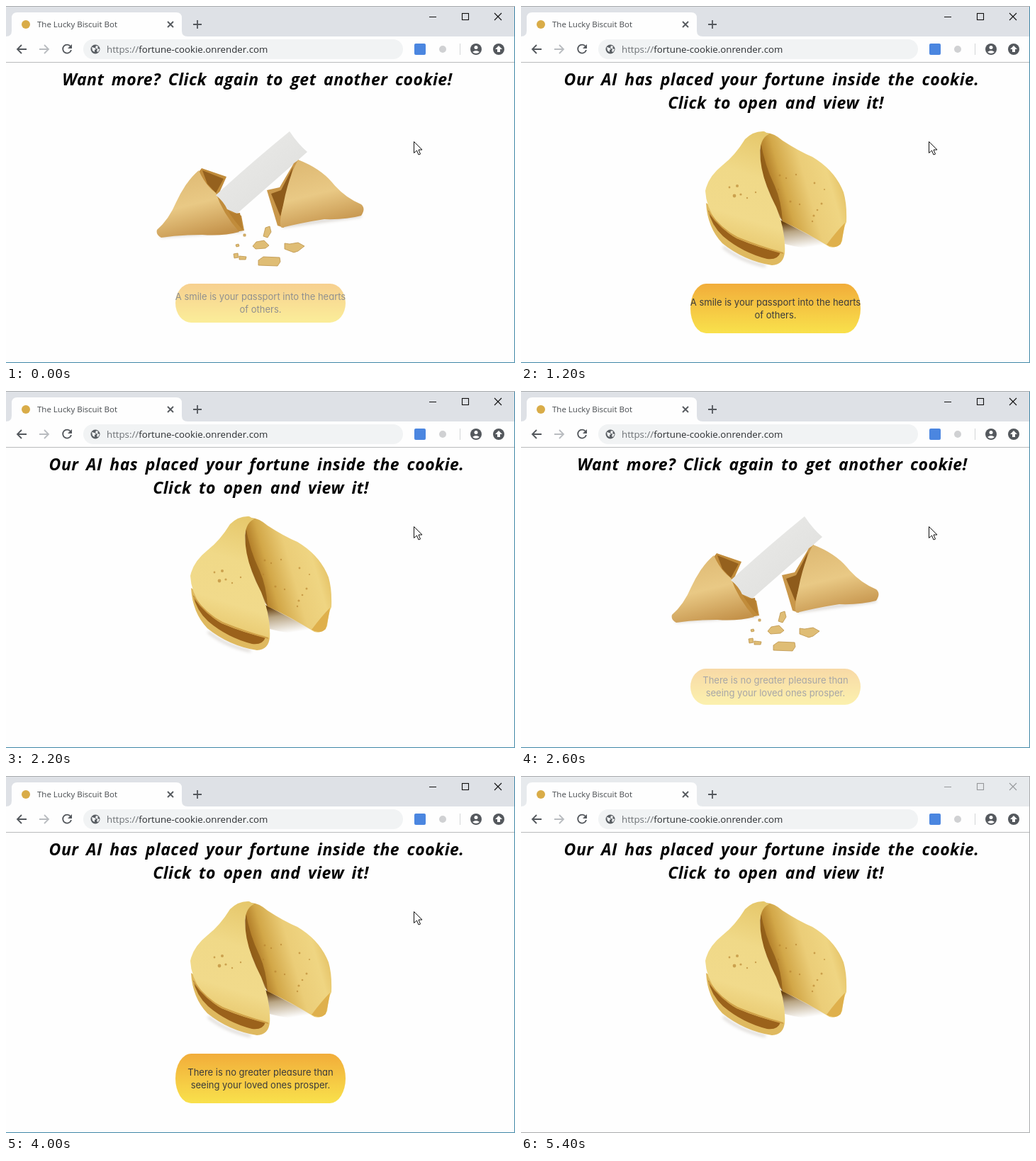
These frames come from a looping animation (718x504 px, 5600 ms). An HTML page:

```html
<!DOCTYPE html>
<html lang="en">
<head>
<meta charset="utf-8">
<title>Cookie</title>
<style>
  html, body { margin: 0; width: 100%; height: 100%; overflow: hidden; background: #fefefe; }
  svg { display: block; }
  text { white-space: pre; }
  .ui { font-family: "Open Sans", "Noto Sans", sans-serif; }
  .head { font: italic 700 23px "Comic Sans MS", "Open Sans", sans-serif; letter-spacing: .5px; word-spacing: 4px; text-anchor: middle; }
  .fortune { font: 13px "Comic Sans MS", Inter, sans-serif; font-feature-settings: "cv11"; text-anchor: middle; }
  .line { fill: none; stroke: #54585d; stroke-width: 1.8; }
  #controls { fill: none; stroke: #111; stroke-width: 1.1; }
  .off #controls { stroke: #96989b; }
  #strip { fill: #dee1e6; }
  .off #strip { fill: #e7eaed; }
  #edge { fill: none; stroke: #3f86a6; }
  .off #edge { stroke: #a9abad; }
  .off #cursor { display: none; }
</style>
</head>
<body>
<svg id="stage" width="718" height="504" viewBox="0 0 718 504">
  <defs>
    <linearGradient id="gold" x2="0" y2="1"><stop stop-color="#ee9500"/><stop offset="1" stop-color="#f8d917"/></linearGradient>
    <linearGradient id="lobe" x1=".6" x2=".4" y2="1">
      <stop stop-color="#e6c86c"/><stop offset=".35" stop-color="#f0d988"/><stop offset=".7" stop-color="#f1da8b"/><stop offset="1" stop-color="#e6c468"/>
    </linearGradient>
    <linearGradient id="flap" x1=".1" y1=".5" x2=".9" y2=".2">
      <stop stop-color="#a8711f"/><stop offset=".2" stop-color="#d2a748"/><stop offset=".5" stop-color="#ebcd78"/><stop offset=".8" stop-color="#efd582"/><stop offset="1" stop-color="#e3bf61"/>
    </linearGradient>
    <linearGradient id="shell" x1=".3" x2=".6" y2="1">
      <stop stop-color="#deb973"/><stop offset=".5" stop-color="#e9c985"/><stop offset="1" stop-color="#c4924a"/>
    </linearGradient>
    <linearGradient id="shade" x1=".1" y1=".1" x2=".35" y2="1">
      <stop stop-color="#6b4412"/><stop offset=".35" stop-color="#b9a584"/><stop offset="1" stop-color="#fefefe"/>
    </linearGradient>
    <linearGradient id="paper" x2="1" y2="1"><stop stop-color="#ececea"/><stop offset=".6" stop-color="#e3e3e1"/><stop offset="1" stop-color="#d6d5d1"/></linearGradient>
    <filter id="soft" x="-20%" y="-50%" width="140%" height="200%"><feGaussianBlur stdDeviation="2"/></filter>
  </defs>

  <!-- browser window -->
  <rect id="strip" width="718" height="43"/>
  <path d="M0 43q8 0 8-8V17q0-8 8-8h224q8 0 8 8v18q0 8 8 8h462v37H0z" fill="#fefefe"/>
  <path d="M0 79.500H718" stroke="#b9babc"/>
  <circle cx="28" cy="26" r="6" fill="#d9ac48"/>
  <text class="ui" x="44" y="30" font-size="11.500" fill="#45494d">The Lucky Biscuit Bot</text>
  <path class="line" d="M228 22l8 8m0-8l-8 8M264 26h12m-6-6v12"/>
  <g id="controls"><path d="M597 15.500h10M689 10l10 10m0-10l-10 10"/><rect x="643.500" y="10.500" width="9" height="9"/></g>
  <path class="line" d="M29 61H16m6-6l-6 6 6 6"/>
  <path class="line" d="M47 61h13m-6-6l6 6-6 6" style="stroke:#b9bcc0"/>
  <path class="line" d="M91 57a6 6 0 1 0 1 5"/>
  <path d="M93 54v6h-6z" fill="#54585d"/>
  <rect x="109" y="47" width="451" height="28" rx="14" fill="#f1f3f4"/>
  <circle cx="126" cy="61" r="6.500" fill="#5a5f64"/>
  <path d="M121 58l4 1 2 2-2 1v3l-3-2zM127 56l3 1-1 3 3 1-2 4-2-1 1-3-3-2z" fill="#f1f3f4"/>
  <text class="ui" x="142" y="66" font-size="13.250" fill="#6d7175">https://<tspan fill="#2b2e31">fortune-cookie.onrender.com</tspan></text>
  <rect x="576" y="53" width="16" height="16" rx="2" fill="#4b86e0"/>
  <circle cx="616" cy="61" r="5" fill="#d0d1d3"/>
  <path d="M640.500 53v16" stroke="#d3d5d7"/>
  <g fill="#54585d"><circle cx="663" cy="61" r="8"/><circle cx="695" cy="61" r="8"/></g>
  <path d="M695 56l5 5h-3v4h-4v-4h-3zM658 65q5-4 10 0-5 4-10 0" fill="#fefefe"/>
  <circle cx="663" cy="58.500" r="2.500" fill="#fefefe"/>

  <g id="closed">
    <text class="head" x="353.500" y="112">Our AI has placed your fortune inside the cookie.</text>
    <text class="head" x="359.500" y="145">Click to open and view it!</text>
    <path d="M366 302L440 341Q410 346 372 336z" fill="url(#shade)"/>
    <path d="M285 340Q310 360 345 367" fill="none" stroke="#8d8172" stroke-width="3" opacity=".35" filter="url(#soft)"/>
    <path d="M338 182Q350 174 369 190Q392 205 411 213Q443 232 455 263Q460 280 459 305Q455 312 453 332Q447 343 435 340Q403 320 369 304Q352 270 338 230z" fill="url(#flap)"/>
    <path d="M338 192Q344 225 357 252Q367 273 369 304Q352 283 343 253Q334 225 338 192z" fill="#8a5716" opacity=".75"/>
    <path d="M431 337Q446 317 457 306Q454 326 451 336Q443 344 431 337z" fill="#dfb04c"/>
    <path d="M261 278Q263 313 284 335Q315 360 354 366Q371 365 372 347L340 330z" fill="#dfb95f"/>
    <path d="M264 288Q281 315 304 328Q337 342 366 348Q362 359 347 357Q312 348 285 325Q268 309 264 288z" fill="#9b621b"/>
    <path d="M343 177Q328 176 316 188Q302 211 284 225Q264 241 260 261Q261 284 276 304Q299 328 345 342Q365 344 372 350Q374 318 360 284Q337 241 337 204Q339 185 350 181z" fill="url(#lobe)"/>
    <path d="M265 291Q282 315 305 327Q340 341 370 349" fill="none" stroke="#cfa047" stroke-width="2"/>
    <g id="pits" fill="#b88430" opacity=".65"></g>
  </g>

  <g id="open">
    <text class="head" x="354.500" y="112">Want more? Click again to get another cookie!</text>
    <path d="M218 325L334 317M390 311L501 296" stroke="#8d8172" stroke-width="4" opacity=".35" filter="url(#soft)"/>
    <path d="M269 238L276 229 311 241 299 268 320 290 332 296 336 317 316 320 287 266z" fill="#c18c3b"/>
    <path d="M277 232L307 244 296 264 284 251z" fill="#95611e"/>
    <path d="M272 232Q281 253 296 264Q306 293 329 319Q306 325 277 323Q246 323 219 327Q211 323 213 316Q230 301 240 277Q254 247 272 232z" fill="url(#shell)"/>
    <path d="M400 177Q412 195 425 206L326 293 312 287Q307 276 296 267Q345 222 400 177z" fill="url(#paper)"/>
    <path d="M312 287Q319 295 330 292L334 316Q322 304 312 287z" fill="#b67f30"/>
    <path d="M368 260L386 256 406 222 413 217 398 265 392 313 383 310z" fill="#c9974a"/>
    <path d="M374 265L388 260 405 227 397 260 387 297z" fill="#8e5b1b"/>
    <path d="M412 217Q443 229 460 249Q477 270 501 280Q508 286 501 296Q479 302 449 301Q417 306 389 313Q384 309 391 281Q398 243 412 217z" fill="url(#shell)"/>
    <g fill="#dfbd75" stroke="#bd944a" stroke-width=".8">
      <path d="M366 313l6-2 2 8-5 8-6-2zM348 339l5-6 11-2 7 7-5 4-14 1zM393 335l7 1 12-2 9 5-9 7-6 2-13-5zM356 359l7-5 23 1 1 6-4 6-27-1z"/>
      <path d="M335 322l3 0 0 3-3 0zM324 337l4-1 1 3-4 1zM321 350l6-1 1 6-6 1zM329 353l10 1-1 4-9 0z"/>
    </g>
  </g>

  <g id="bubble">
    <path id="tail" d="M295 352V393H278.500Q288 377 295 352z" fill="#ec9200"/>
    <rect id="box" x="239" y="392" width="240" rx="22" fill="url(#gold)"/>
    <text class="fortune" x="359" id="line0"></text>
    <text class="fortune" x="359" id="line1"></text>
  </g>

  <path id="cursor" d="M575.500 191.500v16l4-3.500 2.500 6 2.500-1-2.500-6h5z" fill="#fff" stroke="#111"/>
  <path d="M0 .5H718" stroke="#a9abad"/>
  <path id="edge" d="M717.500 1V503.500H0"/>
</svg>
<script>
const LOOP = 5600, STEP = 200;
const $ = id => document.getElementById(id);
const fortunes = [
  ["A smile is your passport into the hearts", "of others."],
  ["There is no greater pleasure than", "seeing your loved ones prosper."]
];
// [start ms, cookie is open, bubble progress]
const steps = [
  [0, true, .43], [200, true, .86], [400, true, 1],
  [1200, false, .77], [1400, false, .03], [1600, false, 0],
  [2600, true, .34], [2800, true, .9], [3000, true, 1],
  [4000, false, .77], [4200, false, .03], [4400, false, 0]
];

// pits baked into the cookie surface: x, y, radius
const pits = [305, 254, 2, 301, 268, 2.4, 294, 256, 1.4, 310, 266, 1.6, 319, 271, 1.2, 331, 263, 1.2,
  365, 239, 1.5, 374, 243, 1.2, 380, 276, 1.6, 393, 280, 1.2, 388, 238, 1.2, 414, 250, 1.4,
  424, 279, 1.5, 418, 288, 1.3, 413, 296, 1.6, 411, 304, 1.2, 428, 259, 1.1, 363, 259, 1.2];
for (let i = 0; i < pits.length; i += 3) {
  const dot = document.createElementNS("http://www.w3.org/2000/svg", "circle");
  ["cx", "cy", "r"].forEach((key, k) => dot.setAttribute(key, pits[i + k]));
  $("pits").append(dot);
}

const show = (id, on) => $(id).style.display = on ? "" : "none";

function draw(t) {
  const [, open, p] = steps.filter(s => s[0] <= t).pop();
  const height = 36 + 44 * p;
  show("open", open);
  show("closed", !open);
  show("bubble", p > 0);
  show("tail", p === 1);
  $("bubble").setAttribute("opacity", p);
  $("box").setAttribute("height", height);
  $("box").setAttribute("ry", height / 2);
  fortunes[t < 2400 ? 0 : 1].forEach((line, i) => {
    $("line" + i).textContent = line;
    $("line" + i).setAttribute("y", 406 + 22 * p + 18 * i);
  });
  $("stage").classList.toggle("off", t >= 5400);
}

function tick() {
  const t = performance.now() % LOOP;
  draw(t - t % STEP);
  requestAnimationFrame(tick);
}
tick();
</script>
</body>
</html>
```
